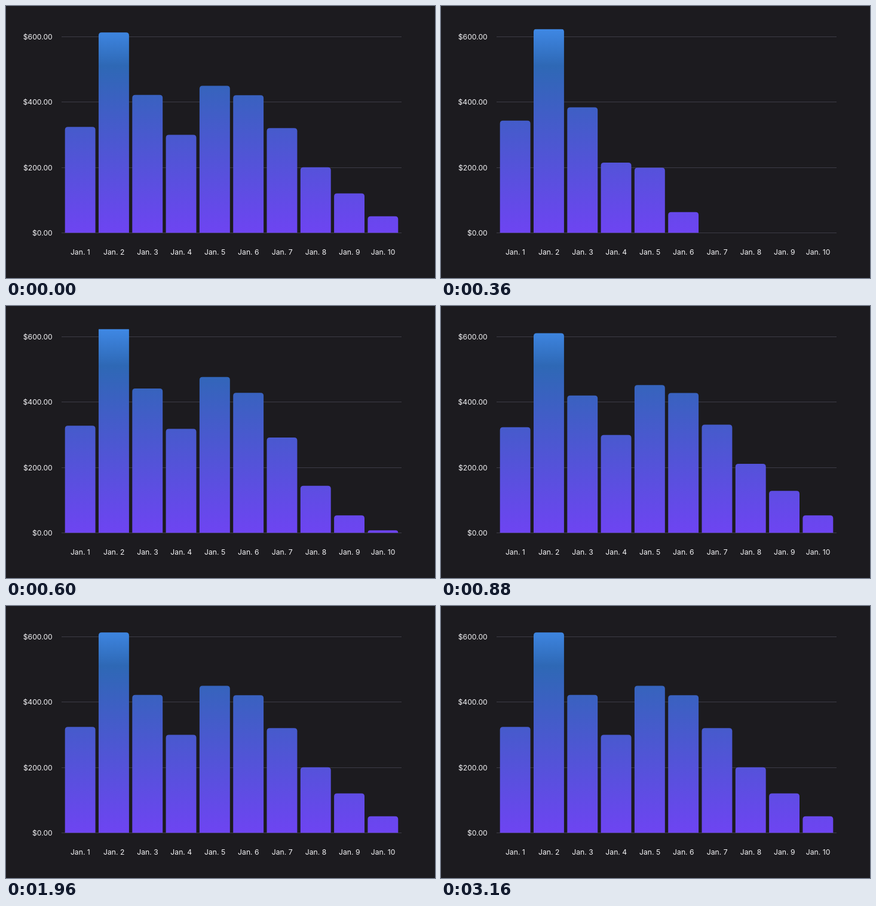
Write an HTML page that moves like this. It is 718 by 455 pixels and loops after 3.18 s.

```html
<!DOCTYPE html>
<html lang="en">
<head>
<meta charset="utf-8">
<title>Daily amounts</title>
<style>
  html, body { margin: 0; width: 100%; height: 100%; overflow: hidden; background: #1c1b1f; }
  svg { display: block; width: 718px; height: 455px; }
  text { font: 400 12.2px Inter, "Liberation Sans", sans-serif; fill: #f4f4f6; }
  .grid line { stroke: #3d3c46; stroke-width: 1; }
</style>
</head>
<body>
<svg viewBox="0 0 718 455">
  <defs>
    <linearGradient id="fill" gradientUnits="userSpaceOnUse" x1="0" y1="38.7" x2="0" y2="379.7">
      <stop offset="0" stop-color="#3f88e4"/>
      <stop offset="0.18" stop-color="#2e68b5"/>
      <stop offset="1" stop-color="#6e44f2"/>
    </linearGradient>
    <clipPath id="plot"><rect x="93" y="38.7" width="569" height="341"/></clipPath>
  </defs>
  <g class="grid"></g>
  <g class="bars" fill="url(#fill)" clip-path="url(#plot)"></g>
  <g class="labels"></g>
</svg>
<script>
const LOOP = 3180, STEP = 20, STAGGER = 60;
const BASE = 379.6, SCALE = 0.547;
const LEFT = 98.7, PITCH = 56.3, WIDTH = 50.9, RADIUS = 5;
const values = [324, 613, 422, 300, 450, 421, 320.5, 201, 121, 51];

function add(group, tag, attrs, text = "") {
  const el = document.createElementNS("http://www.w3.org/2000/svg", tag);
  for (const key in attrs) el.setAttribute(key, attrs[key]);
  el.textContent = text;
  document.querySelector(group).append(el);
  return el;
}

for (let amount = 0; amount <= 600; amount += 200) {
  const y = BASE - amount * SCALE;
  const lineY = Math.floor(y) + 0.5;
  add(".grid", "line", { x1: 93, x2: 662, y1: lineY, y2: lineY });
  add(".labels", "text", { x: 77.8, y: y + 4.5, "text-anchor": "end" }, `$${amount}.00`);
}

const bars = values.map((value, i) => {
  const x = LEFT + i * PITCH;
  add(".labels", "text", { x: x + WIDTH / 2 + 0.2, y: 416, "text-anchor": "middle" }, `Jan. ${i + 1}`);
  return { x, height: value * SCALE, el: add(".bars", "path", {}) };
});

// Underdamped spring from 0 to 1
function spring(ms) {
  if (ms <= 0) return 0;
  const s = ms / 1000, decay = 7, freq = 8;
  return 1 - Math.exp(-decay * s) * (Math.cos(freq * s) + decay / freq * Math.sin(freq * s));
}

function barPath(x, h) {
  if (h < 0.1) return "";
  const r = Math.min(RADIUS, h), top = BASE - h;
  return `M${x} ${BASE}V${top + r}Q${x} ${top} ${x + r} ${top}` +
    `H${x + WIDTH - r}Q${x + WIDTH} ${top} ${x + WIDTH} ${top + r}V${BASE}Z`;
}

function draw(ms) {
  const t = Math.floor((ms % LOOP) / STEP) * STEP;
  bars.forEach((bar, i) => {
    // Each loop opens on the settled chart
    const grow = t === 0 ? 1 : spring(t - i * STAGGER);
    bar.el.setAttribute("d", barPath(bar.x, bar.height * grow));
  });
}

const start = performance.now();
function tick() {
  draw(performance.now() - start);
  requestAnimationFrame(tick);
}
tick();
</script>
</body>
</html>
```
